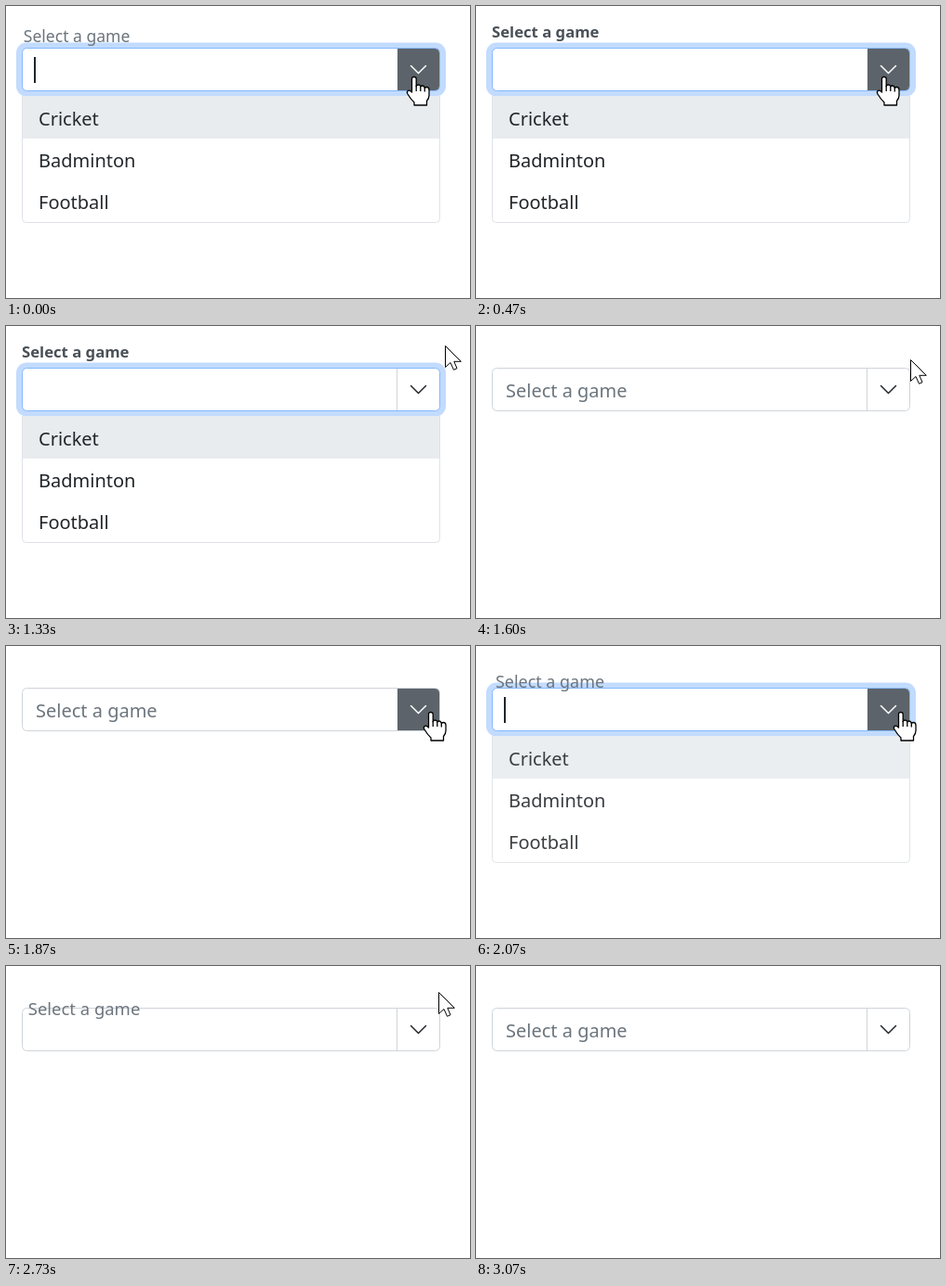
Recreate the animation shown at these times as an HTML page. Size 499 by 315 pixels, loop 3540 ms.

```html
<!DOCTYPE html>
<html lang="en">
<head>
<meta charset="utf-8">
<style>
  html, body { margin: 0; width: 100%; height: 100%; overflow: hidden; background: #fff; }
  svg { display: block; width: 499px; height: 315px; }
  text { font: 20px "Noto Sans", "Open Sans", sans-serif; fill: #212529; }
</style>
</head>
<body>
<svg viewBox="0 0 499 315">
  <rect id="ring" x="11" y="39.5" width="462" height="58" rx="11" fill="#c2dbfe"/>
  <rect x="17.5" y="45.5" width="449" height="46" rx="5" fill="#fff"/>
  <path id="button" d="M421 46H461.5Q466 46 466 50.500V86.500Q466 91 461.500 91H421Z" fill="#5c636a"/>
  <path id="divider" d="M420.500 46V91" stroke="#ced4da"/>
  <rect id="border" x="17.5" y="45.5" width="449" height="46" rx="5" fill="none"/>
  <path id="chevron" d="M435.500 64.500L443.500 72.500 451.500 64.500" fill="none" stroke-width="1.500" stroke-linecap="round" stroke-linejoin="round"/>
  <g id="popup">
    <path d="M17.500 97V229.500Q17.500 233.500 21.500 233.500H462.500Q466.500 233.500 466.500 229.500V97" fill="#fff" stroke="#dee2e6"/>
    <path d="M18 97H466V143H18Z" fill="#e9ecef"/>
    <text x="35" y="129">Cricket</text>
    <text x="35" y="174">Badminton</text>
    <text x="35" y="219">Football</text>
  </g>
  <text id="label">Select a game</text>
  <rect id="caret" x="30" y="55" width="2" height="28" fill="#212529"/>
  <g id="cursor" fill="#fff" stroke="#000" stroke-linejoin="round">
    <path id="arrow" d="M.5 .5V23.500L6 18.500 9.500 26.300 13 24.700 9.800 17.300H17.300Z"/>
    <g id="hand" stroke-width="1.300">
      <path d="M-2.500 16V1.500Q-2.500 -.5 -.2 -.5T2.200 1.500V9.500Q2.500 8 4.500 8T6.800 10Q7.200 9 9 9T11.300 11.300Q11.800 10.500 13.500 10.500Q16 10.500 16 13.500V19.500Q16 22.500 13.500 25.500V30H0V27Q-3.500 24 -7.300 17.500C-8.500 14.500 -5.500 12.500 -2.500 16Z"/>
      <path d="M2.200 9V15M6.800 10V15M11.300 11.300V15.500" fill="none"/>
    </g>
  </g>
</svg>
<script>
const $ = id => document.getElementById(id);
const LOOP = 3540, STEP = 1000 / 15, FLOAT = 250;

// time in ms, focused
const focusChanges = [[-99, 1], [1365, 0], [2000, 1], [2698, 0]];
// step, pointer x, y
const path = [[13, 439, 77], [20, 472, 21], [21, 472, 21], [24, 467, 36],
  [28, 457, 72], [34, 457, 72], [37, 459, 41], [39, 465, 28], [41, 465, 28], [45, 232, 310]];
// caret visible from step, to step
const blinks = [[0, 7], [15, 20], [30, 38]];

const lerp = (a, b, p) => a + (b - a) * p;
const show = (id, on) => $(id).setAttribute("visibility", on ? "visible" : "hidden");
const set = (id, attrs) => {
  for (const name in attrs) $(id).setAttribute(name, attrs[name]);
};

// cubic-bezier(.25, .8, .25, 1)
function ease(x) {
  if (x >= 1) return 1;
  let lo = 0, hi = 1;
  for (let i = 0; i < 24; i++) {
    const s = (lo + hi) / 2;
    if (.75 * s * (1 - s) + s ** 3 < x) lo = s; else hi = s;
  }
  return 2.4 * lo * (1 - lo) ** 2 + 3 * lo * lo * (1 - lo) + lo ** 3;
}

function pointer(step) {
  if (step <= path[0][0]) return path[0].slice(1);
  const i = path.findIndex(key => key[0] >= step);
  if (i < 0) return path.at(-1).slice(1);
  const [a, ax, ay] = path[i - 1], [b, bx, by] = path[i];
  const p = (step - a) / (b - a);
  return [lerp(ax, bx, p), lerp(ay, by, p)];
}

function draw(ms) {
  const step = Math.floor((ms + 4) / STEP), time = step * STEP;
  const [since, focused] = focusChanges.findLast(change => change[0] <= time);
  const age = time - since;
  const moved = ease(age / FLOAT);
  const raised = focused ? moved : 1 - moved;
  const settled = raised === 1;

  show("ring", focused);
  set("border", { stroke: focused ? "#86b7fe" : "#ced4da" });
  set("popup", { opacity: focused ? 1 - (1 - Math.min(1, age / 160)) ** 4 : 0 });
  set("label", { x: lerp(32, 17, raised), y: lerp(77, 34, raised) });
  $("label").style.fontSize = (settled ? 16.7 : lerp(20, 17.2, raised)) + "px";
  $("label").style.fontWeight = settled ? 600 : 400;
  $("label").style.fill = settled ? "#495057" : "#6c757d";
  show("caret", blinks.some(([from, to]) => step >= from && step < to));

  const [x, y] = pointer(step);
  const hover = x > 420 && x < 467 && y > 45 && y < 92;
  const inside = step < 46;
  set("cursor", { transform: `translate(${Math.round(x)} ${Math.round(y)})` });
  show("arrow", inside && !hover);
  show("hand", inside && hover);
  show("button", hover);
  show("divider", !hover);
  set("chevron", { stroke: hover ? "#fff" : "#212529" });
}

const start = performance.now();
function tick() {
  draw((performance.now() - start) % LOOP);
  requestAnimationFrame(tick);
}
tick();
</script>
</body>
</html>
```
